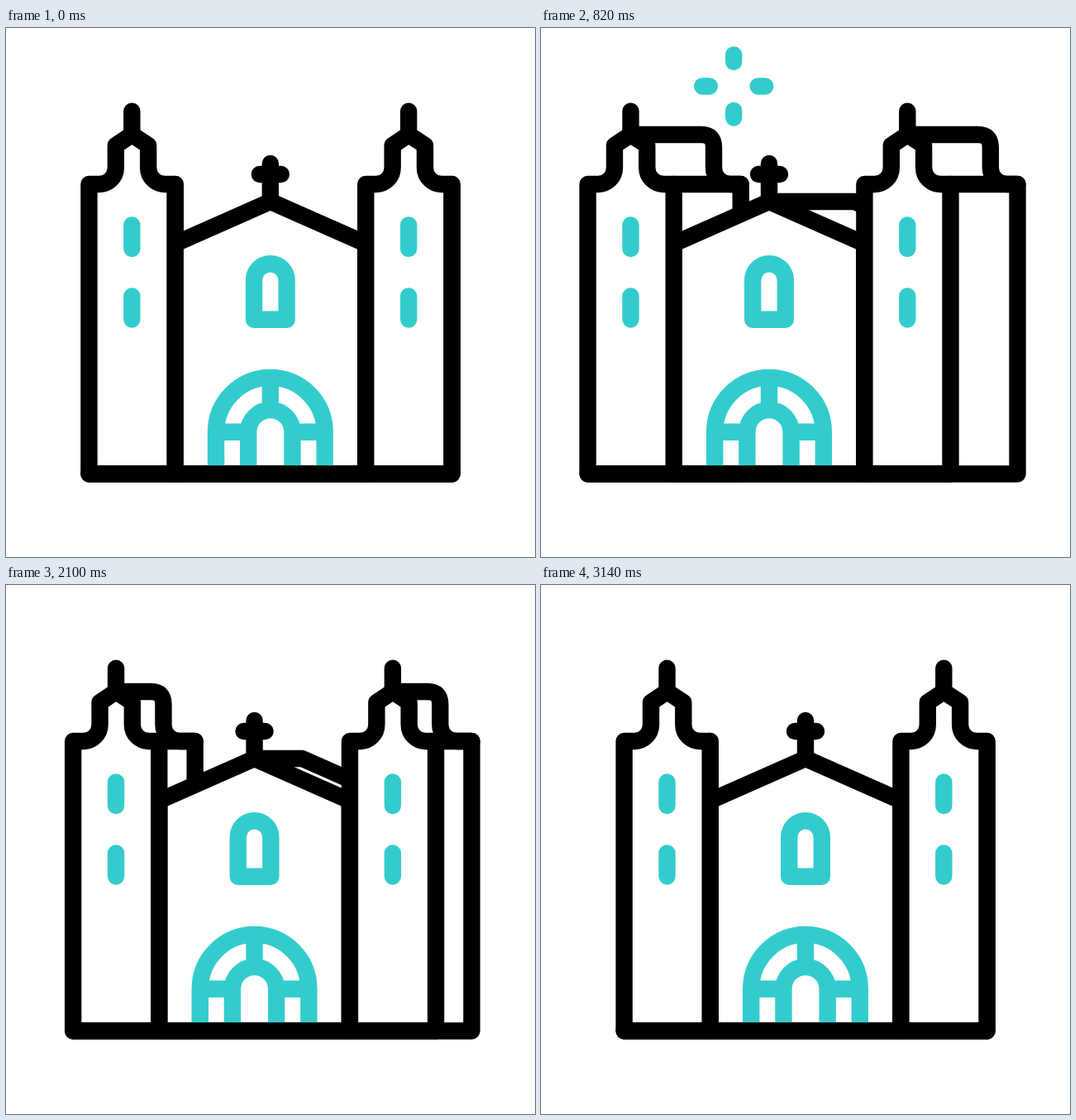
Recreate the animation shown at these times as an HTML page with a canvas. Size 640x640 px, loop 3600 ms.

```html
<!DOCTYPE html>
<html lang="en">
<head>
<meta charset="utf-8">
<title>Church</title>
<style>
html, body { margin: 0; width: 100%; height: 100%; overflow: hidden; background: #fff; }
canvas { display: block; width: 640px; height: 640px; }
</style>
</head>
<body>
<canvas id="stage" width="640" height="640"></canvas>
<script>
const ctx = document.getElementById('stage').getContext('2d');
const LOOP = 3600, BLACK = '#000', TEAL = '#33cccc';
const TOWERS = [0, 334.8];

// Horizontal shifts over time
const TIMES = [0, 100, 240, 360, 480, 820, 1480, 1650, 2100, 2400, 2700, 3140, 3600];
const front = track([0, 16, 29, 36, 40, 44, 47.5, 48.2, 19.5, 7, 1.8, 0, 0]);
const back = track([0, 13, 24, 29.5, 33, 37, 40, 40.6, 24, 8.2, 1.8, 0, 0]);
const neck = track([0, 13, 24, 29.5, 33, 36.5, 37.6, 38, 18, 2.4, 0.3, 0, 0]);

// Monotone cubic curve through the values
function track(v) {
  const d = v.slice(1).map((y, i) => (y - v[i]) / (TIMES[i + 1] - TIMES[i]));
  const slope = v.map((_, i) => {
    if (i === 0) return d[0];
    if (i === d.length) return 0;
    const a = d[i - 1], b = d[i];
    return a * b > 0 ? 2 * a * b / (a + b) : 0;
  });
  return t => {
    let i = 0;
    while (i < d.length - 1 && t >= TIMES[i + 1]) i++;
    const h = TIMES[i + 1] - TIMES[i], s = (t - TIMES[i]) / h, r = 1 - s;
    return v[i] * r * r * (1 + 2 * s) + v[i + 1] * s * s * (3 - 2 * s)
      + h * s * r * (slope[i] * r - slope[i + 1] * s);
  };
}

function draw(d, color, fill) {
  const path = new Path2D(d);
  if (fill) {
    ctx.fillStyle = fill;
    ctx.fill(path);
  }
  ctx.strokeStyle = color;
  ctx.stroke(path);
}

function drawBack(f, b, n) {
  const apex = 320 + b * 1.6, end = 440 - f;
  draw(`M${320 - f} 210H${apex}L${end} ${210 + Math.max(0, end - apex) * 0.442}`, BLACK);
  for (const x of TOWERS) {
    const side = x + 172.5 + n, wall = x + 204.7 + b, corner = x + 204.7 - f;
    const r = Math.min(15, (n + f) / 2 + 1);
    if (n + f > 1) {
      draw(`M${x + 152.5 - f} 129H${side - r}Q${side} 129 ${side} ${129 + r}V169a20 20 0 0 0 20 20H${wall}`, BLACK);
    }
    draw(`M${corner} 189H${wall}V539.5H${corner}`, BLACK);
  }
}

function drawFront() {
  draw('M204.7 539.5V261L320 210L435.3 261V539.5Z', BLACK, '#fff');
  draw('M320 164V210M307 177H333', BLACK);
  draw('M300.2 352.7V305a19.8 19.8 0 0 1 39.6 0V352.7Z', TEAL);
  draw('M254.2 535V488.7a65.8 65.8 0 0 1 131.6 0V535'
    + 'M293.4 535V488.7a26.6 26.6 0 0 1 53.2 0V535'
    + 'M254.2 488.7H293.4M346.6 488.7H385.8M320 422.9V462', TEAL);
  for (const x of TOWERS) {
    ctx.save();
    ctx.translate(x, 0);
    draw('M100.6 539.5V189H113a20 20 0 0 0 20 -20V142L152.5 129L172.3 142V169'
      + 'a20 20 0 0 0 20 20H204.7V539.5Z', BLACK, '#fff');
    draw('M152.5 100.8V129', BLACK);
    draw('M152.5 238.5V267M152.5 324.5V352.6', TEAL);
    ctx.restore();
  }
  draw('M100.6 539.5H539.5', BLACK);
}

function drawSparkle(cx, cy, age) {
  if (age < 0 || age > 720) return;
  const tip = Math.min(48, 29.5 + age * 0.0265);
  const tail = 29 + 19 * Math.max(0, (age - 280) / 440) ** 1.6;
  ctx.save();
  ctx.translate(cx, cy);
  for (let i = 0; i < 4; i++) {
    draw(`M${Math.min(tail, tip - 0.01)} 0H${tip}`, TEAL);
    ctx.rotate(Math.PI / 2);
  }
  ctx.restore();
}

function frame(now) {
  const t = now % LOOP, f = front(t);
  ctx.fillStyle = '#fff';
  ctx.fillRect(0, 0, 640, 640);
  ctx.lineWidth = 20.4;
  ctx.lineCap = ctx.lineJoin = 'round';
  drawBack(f, back(t), neck(t));
  ctx.save();
  ctx.translate(-f, 0);
  drawFront();
  ctx.restore();
  drawSparkle(233.2, 70.5, t - 500);
  drawSparkle(365.2, 107.5, t - 1080);
}

const start = performance.now();
function tick() {
  frame(performance.now() - start);
  requestAnimationFrame(tick);
}
tick();
</script>
</body>
</html>
```
